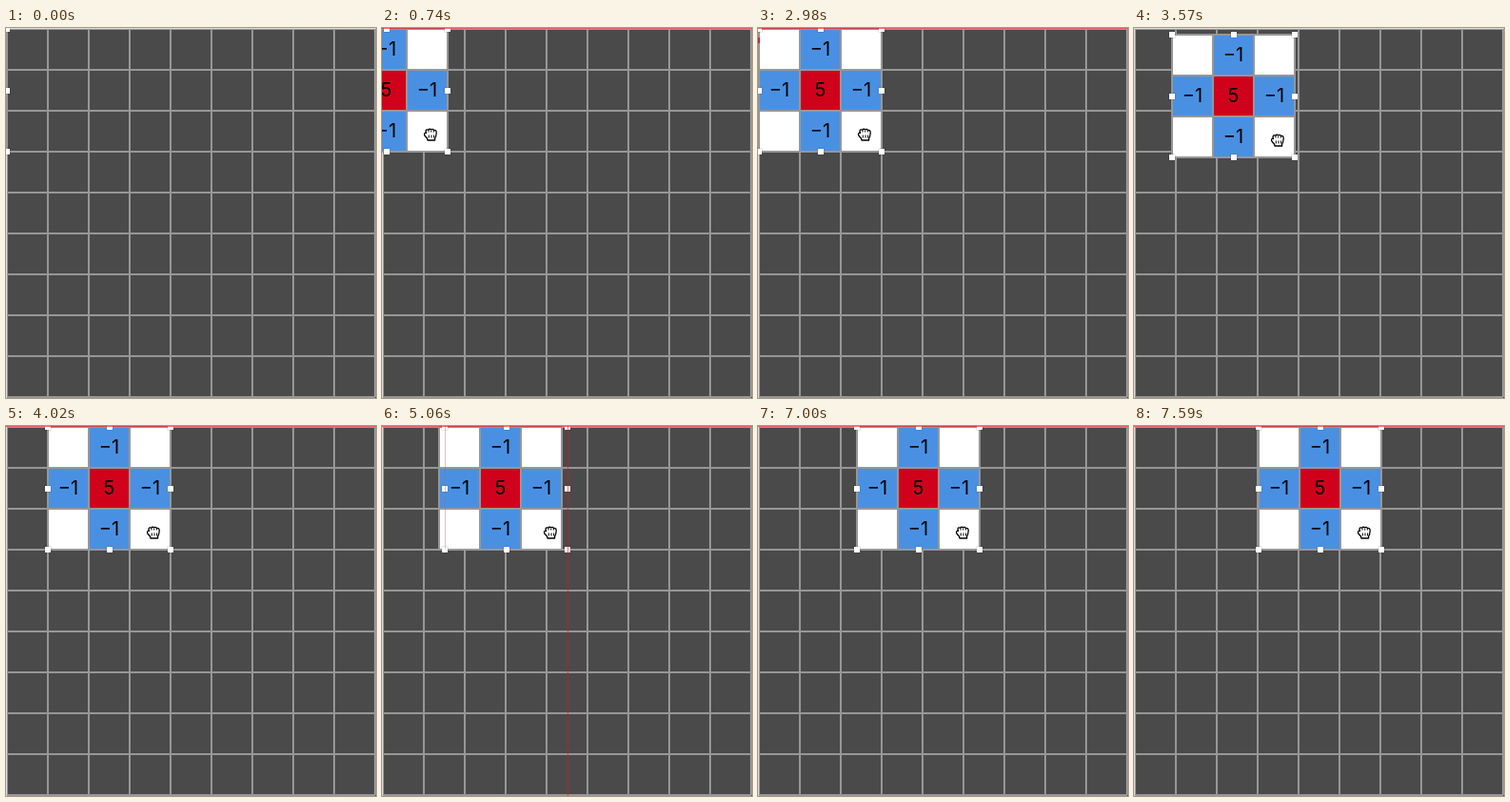
Animation, 389 px wide and 389 px high, one loop 8000 ms. Source, as an HTML page with a canvas:

```html
<!DOCTYPE html>
<html lang="en">
<head>
<meta charset="utf-8">
<title>Kernel dragged over a grid</title>
<style>
  html, body { margin: 0; width: 100%; height: 100%; overflow: hidden; background: #4a4a4a; }
  canvas { display: block; width: 100%; height: 100%; }
</style>
</head>
<body>
<canvas id="stage" width="389" height="389"></canvas>
<script>
const ctx = document.getElementById('stage').getContext('2d');
const SIZE = 389, CELL = 43, KERNEL = 3 * CELL, LOOP = 8000, STEP = 148.8;
const LINE = '#979797', BLUE = '#4a90e2', RED = '#d0021b', GUIDE = 'rgba(240,10,30,.6)';
const SNAP_GAP = 6;

// Each drag starts where the previous one ended; times are counted in steps.
const start = { x: -128, y: 1 };
const drags = [
  { from: 1, to: 9, x: -11, y: 1 },
  { from: 9, to: 12, x: 1, y: 1 },
  { from: 20, to: 24, x: 40, y: 7 },
  { from: 25, to: 27, x: 44, y: 1 },
  { from: 31, to: 37, x: 82, y: 1 },
  { from: 40, to: 42, x: 86, y: 1 },
  { from: 45, to: 51, x: 131, y: 1 }
];

const fist = new Path2D(
  'M-3 6 L-3.5 4 L-6 1.2 Q-7.3 -1.4 -5 -1.8 L-4.5 -1.5 L-5 -3.5 ' +
  'Q-4.5 -6 -2.2 -4.8 Q-1.2 -6.4 .8 -5.3 Q2.4 -6.3 3.5 -4.5 ' +
  'Q6.4 -5 6.2 -1.5 L5.6 2 L4.6 4 L4.6 6 Z');

const easeOut = p => 1 - (1 - p) ** 1.25;

function positionAt(step) {
  let { x, y } = start;
  for (const drag of drags) {
    const progress = (step - drag.from) / (drag.to - drag.from);
    const eased = easeOut(Math.min(1, Math.max(0, progress)));
    x += (drag.x - x) * eased;
    y += (drag.y - y) * eased;
  }
  return { x: Math.round(x), y: Math.round(y) };
}

function fillRect(color, x, y, w, h) {
  ctx.fillStyle = color;
  ctx.fillRect(x, y, w, h);
}

function drawGridLines(x, y, cells) {
  const length = cells * CELL;
  for (let at = 0; at <= length; at += CELL) {
    fillRect(LINE, x + at - 1, y, 2, length);
    fillRect(LINE, x, y + at - 1, length, 2);
  }
}

function drawBoard() {
  fillRect('#4a4a4a', 0, 0, SIZE, SIZE);
  drawGridLines(1, 1, 9);
  fillRect('#dcdcdc', 0, 0, SIZE, 1);
  fillRect('#dcdcdc', 0, 0, 1, SIZE);
}

function drawKernel(x, y) {
  ctx.font = '20px Inter, sans-serif';
  ctx.textAlign = 'center';
  fillRect('#fff', x, y, KERNEL, KERNEL);
  for (let row = 0; row < 3; row++) {
    for (let col = 0; col < 3; col++) {
      const distance = Math.abs(row - 1) + Math.abs(col - 1);
      if (distance > 1) continue;
      const left = x + col * CELL, top = y + row * CELL;
      fillRect(distance ? BLUE : RED, left, top, CELL, CELL);
      ctx.fillStyle = '#000';
      ctx.fillText(distance ? '−1' : '5', left + CELL / 2, top + CELL / 2 + 6.5);
    }
  }
  drawGridLines(x, y, 3);
}

function drawHandles(x, y) {
  for (let row = 0; row < 3; row++) {
    for (let col = 0; col < 3; col++) {
      if (row === 1 && col === 1) continue;
      const left = Math.round(x + col * KERNEL / 2) - 3;
      const top = Math.round(y + row * KERNEL / 2) - 3;
      fillRect('rgba(0,0,0,.2)', left - 0.5, top - 0.5, 7, 7);
      fillRect('#fff', left, top, 6, 6);
    }
  }
}

function drawCursor(x, y) {
  ctx.save();
  ctx.translate(x, y);
  ctx.lineJoin = 'round';
  ctx.lineWidth = 1.3;
  ctx.strokeStyle = '#000';
  ctx.fillStyle = '#fff';
  ctx.fill(fist);
  ctx.stroke(fist);
  ctx.lineWidth = 1;
  ctx.beginPath();
  for (const finger of [-2, 0.7, 3.3]) {
    ctx.moveTo(finger, -4.5);
    ctx.lineTo(finger, -2.5);
    ctx.moveTo(finger + 0.3, 0.5);
    ctx.lineTo(finger + 0.3, 3.5);
  }
  ctx.stroke();
  ctx.restore();
}

function draw(time) {
  const step = Math.floor((time + 9) / STEP);
  const { x, y } = positionAt(step);
  // The selection jumps ahead of its content when its right edge meets the centre.
  const snapped = Math.abs(x + KERNEL - SIZE / 2) < 1;

  drawBoard();
  drawKernel(x - (snapped ? SNAP_GAP : 0), y);
  drawHandles(x, y);
  if (snapped) {
    fillRect('rgba(150,110,120,.4)', x, 0, 1, KERNEL);
    fillRect(GUIDE, x + KERNEL, 0, 1, SIZE);
  }
  if (y === start.y && step > drags[0].from) fillRect(GUIDE, 0, 0, SIZE, 1);
  if (x === 1) fillRect('#e0203a', 0, 10, 2, 6);
  drawCursor(x + 111, y + 111);
}

function tick() {
  draw(performance.now() % LOOP);
  requestAnimationFrame(tick);
}
tick();
</script>
</body>
</html>
```
